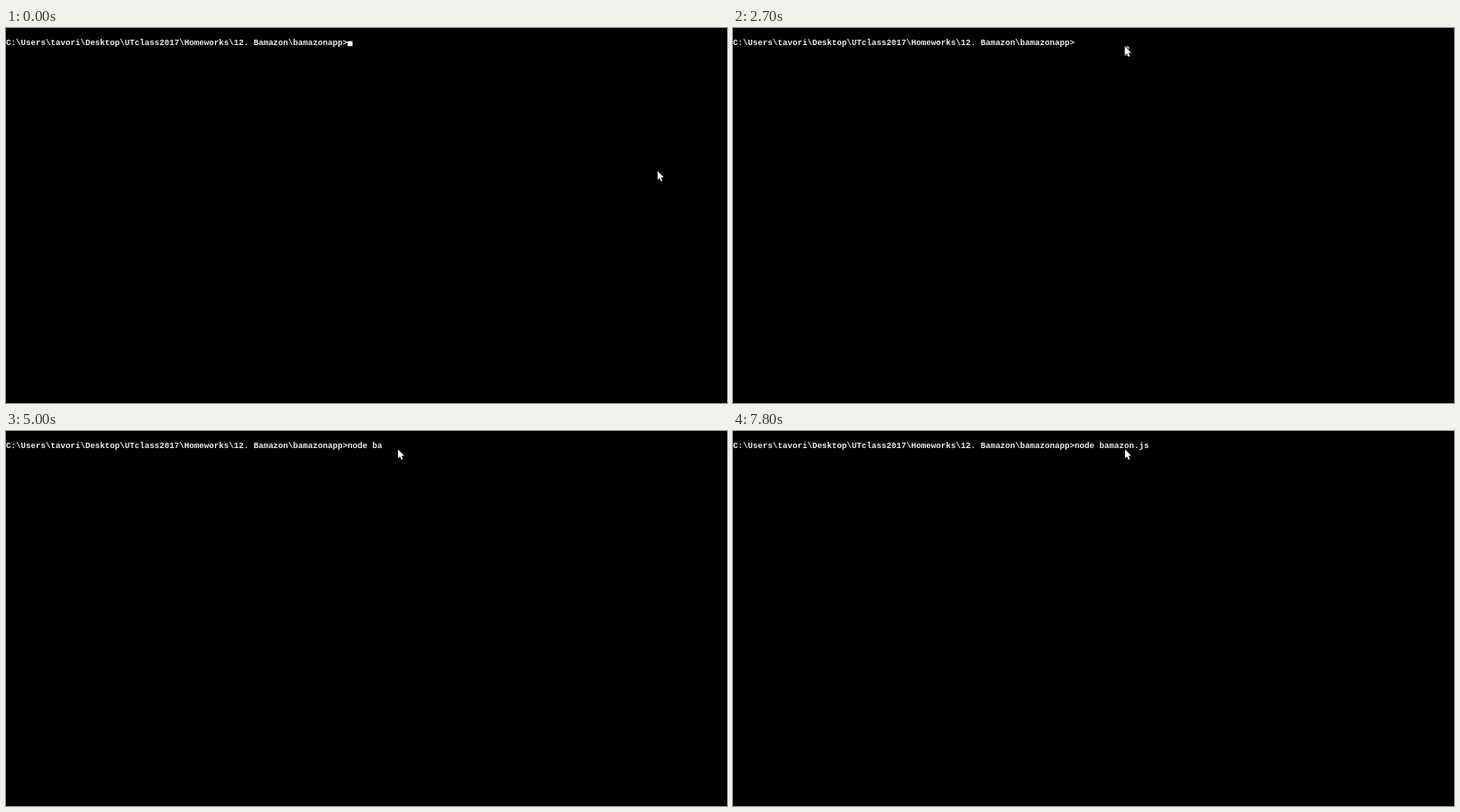
These frames come from a looping animation (800 px wide and 417 px high, 8 s). An HTML page with a canvas:

```html
<!DOCTYPE html>
<html lang="en">
<head>
<meta charset="utf-8">
<title>Terminal</title>
<style>
  html, body { margin: 0; width: 100%; height: 100%; overflow: hidden; background: #000; }
  canvas { display: block; }
</style>
</head>
<body>
<canvas id="stage" width="800" height="417"></canvas>
<script>
const ctx = document.getElementById('stage').getContext('2d');
const LOOP = 8000, STEP = 100;
const CELL = 5.493, LINE = 11, BASELINE = 19;
const PROMPT = 'C:\\Users\\tavori\\Desktop\\UTclass2017\\Homeworks\\12. Bamazon\\bamazonapp>';
const COMMAND = 'node bamazon.js';
const BLINK = 1020, KEY_FLASH = 200;
const ENTER = 7600;

// Bursts of typing: time, characters typed so far
const TYPING = [[3000, 0], [3400, 3], [4600, 7], [5000, 7], [6000, 12], [6400, 13], [6700, 13], [7200, 15]];
// Pointer stops: time, x, y
const PATH = [[100, 723, 159], [900, 459, 28], [1400, 435, 20.5]];

const linear = p => p;
const smooth = p => p * p * (3 - 2 * p);

// Values at time t between key points, held at both ends
function follow(points, t, ease) {
  const next = points.findIndex(([time]) => time > t);
  if (next < 0) return points[points.length - 1].slice(1);
  if (next === 0) return points[0].slice(1);
  const [t0, ...from] = points[next - 1], [t1, ...to] = points[next];
  const p = ease((t - t0) / (t1 - t0));
  return from.map((v, i) => v + (to[i] - v) * p);
}

const typedAt = t => Math.floor(follow(TYPING, t, linear)[0]);

// The caret blinks steadily and lights up at each key press
function caretLit(t) {
  const justTyped = typedAt(t) > typedAt(t - KEY_FLASH);
  return justTyped || t % BLINK < BLINK / 2;
}

function drawText(text) {
  ctx.font = 'bold 9.155px "Liberation Mono", monospace';
  ctx.fillStyle = '#eee';
  [...text].forEach((ch, i) => ctx.fillText(ch, i * CELL, BASELINE));
}

function drawCaret(column, row) {
  ctx.fillStyle = '#fff';
  ctx.fillRect(column * CELL, 14.6 + row * LINE, CELL, 5.6);
}

function drawSelection(column) {
  ctx.fillStyle = '#c0c0c0';
  ctx.fillRect(column * CELL, 20.4, CELL, LINE - 0.5);
}

function drawPointer(x, y) {
  ctx.save();
  ctx.translate(x, y);
  const shape = new Path2D('M0 0V9.8L2.2 7.8L3.8 11.4L5.3 10.8L3.8 7.2L6.8 7Z');
  ctx.strokeStyle = '#000';
  ctx.lineWidth = 1.2;
  ctx.stroke(shape);
  ctx.fillStyle = '#fff';
  ctx.fill(shape);
  ctx.restore();
}

function draw(t) {
  ctx.fillStyle = '#000';
  ctx.fillRect(0, 0, 800, 417);
  const line = PROMPT + COMMAND.slice(0, typedAt(t));
  drawText(line);
  if (caretLit(t)) {
    if (t < ENTER) drawCaret(line.length, 0);
    else drawCaret(0, 1);
  }
  // A click in the window marks one cell for a moment
  if (t >= 2500 && t < 2900) drawSelection(79);
  drawPointer(...follow(PATH, t, smooth));
}

function tick() {
  const t = performance.now() % LOOP;
  draw(Math.floor(t / STEP) * STEP);
  requestAnimationFrame(tick);
}
tick();
</script>
</body>
</html>
```
